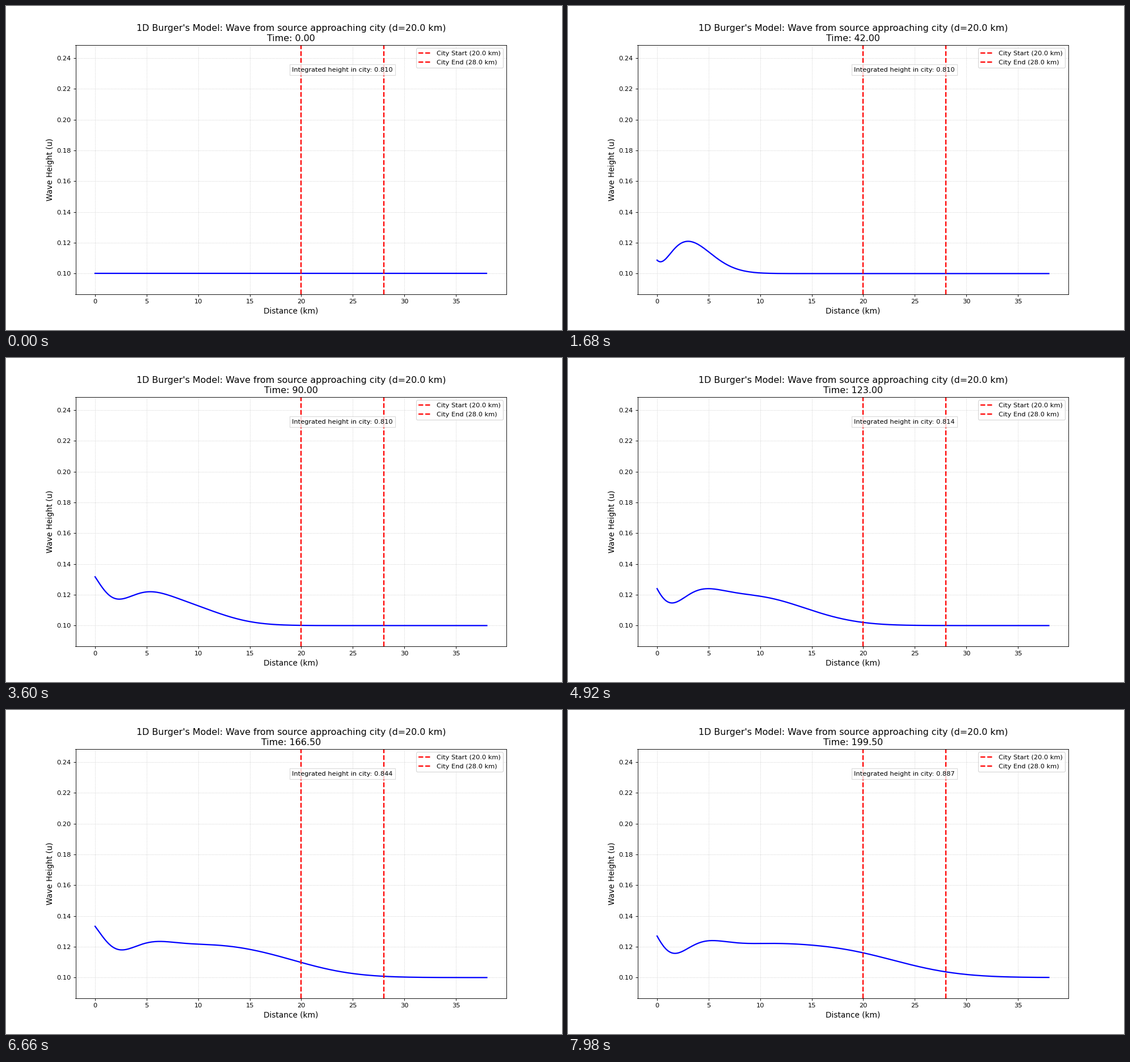
A matplotlib script for the animation above (8 s loop, 980 px wide and 572 px high).

```python
import numpy as np
import matplotlib.pyplot as plt
from matplotlib.animation import FuncAnimation

plt.rcParams["font.family"] = "DejaVu Sans"

# Stage and timing
DPI = 245 / 3
W, H = 980, 572
TICK_MS, HOLD, TICKS = 20, 3, 400
FRAME_T = 1.5

# Viscous Burgers model
BASE, AMP, PERIOD = 0.1, 0.035, 75.0
NU, DX, DT = 0.1, 0.1, 0.025
CITY = (20.0, 28.0)
SUBSTEPS = round(FRAME_T / DT)

x = np.linspace(0, 38, 381)
in_city = (x > CITY[0] - DX / 2) & (x < CITY[1] + DX / 2)


def inlet(t):
    return BASE + AMP * abs(np.sin(2 * np.pi * t / PERIOD))


def advance(u, t):
    flux = u * u / 2
    new = u.copy()
    new[1:-1] += DT * (NU * (u[2:] - 2 * u[1:-1] + u[:-2]) / DX**2
                       - (flux[2:] - flux[:-2]) / (2 * DX))
    new[0] = inlet(t + DT)
    new[-1] = new[-2]
    return new


def simulate(count):
    u = np.full_like(x, BASE)
    states = [u, u]  # the inlet starts one step late
    step = 0
    while len(states) < count:
        for _ in range(SUBSTEPS):
            u = advance(u, step * DT)
            step += 1
        states.append(u)
    return states


states = simulate((TICKS - 1) // HOLD + 1)

fig, ax = plt.subplots(figsize=(W / DPI, H / DPI + 1e-9), dpi=DPI)
wave, = ax.plot(x, states[0], color="blue", lw=2)
for name, pos in zip(("Start", "End"), CITY):
    ax.axvline(pos, color="red", ls="--", lw=2, label=f"City {name} ({pos:.1f} km)")

ax.set_xlim(-1.9, 39.9)
ax.set_ylim(0.0865, 0.2485)
ax.set_xlabel("Distance (km)", fontsize=12)
ax.set_ylabel("Wave Height (u)", fontsize=12)
ax.grid(True, ls=":", alpha=0.7)
ax.legend(loc="upper right", fontsize=10)
title = ax.set_title("", fontsize=14)
note = ax.text(sum(CITY) / 2, 0.2323, "", fontsize=10, ha="center", va="center",
               bbox=dict(facecolor="white", edgecolor="lightgray", alpha=0.8))


def update(tick):
    k = tick // HOLD
    u = states[k]
    wave.set_ydata(u)
    title.set_text("1D Burger's Model: Wave from source approaching city "
                   f"(d={CITY[0]:.1f} km)\nTime: {k * FRAME_T:.2f}")
    note.set_text(f"Integrated height in city: {u[in_city].sum() * DX:.3f}")
    return wave, title, note


anim = FuncAnimation(fig, update, frames=TICKS, interval=TICK_MS,
                     init_func=lambda: update(0), repeat=True, repeat_delay=0)
plt.show()
```
